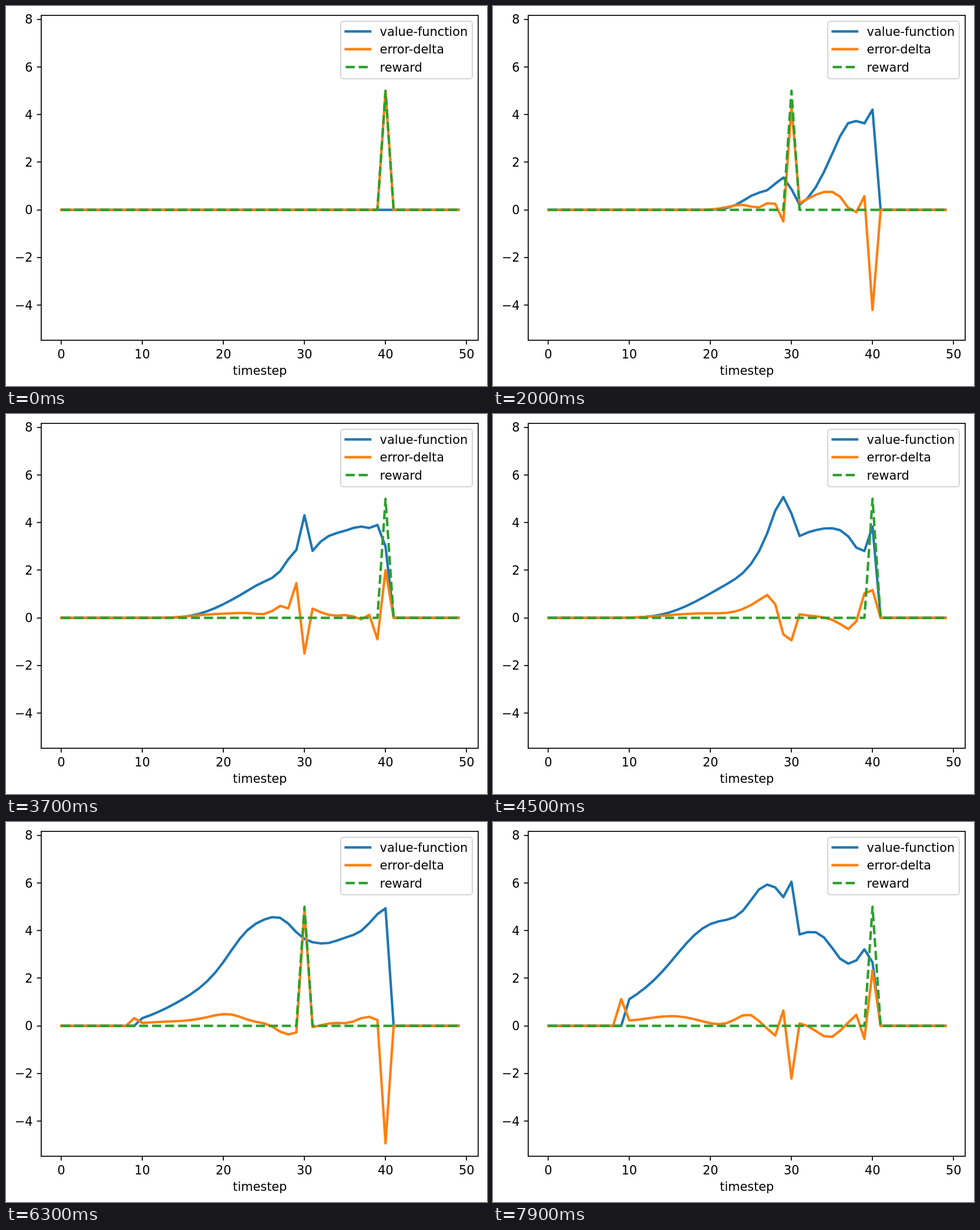
Write an HTML page that moves like this. It is 819 by 648 pixels and loops after 8000 ms.

```html
<!DOCTYPE html>
<html lang="en">
<head>
<meta charset="utf-8">
<title>Temporal-difference learning</title>
<style>
  html, body { margin: 0; width: 100%; height: 100%; overflow: hidden; background: #fff; }
  svg { display: block; width: 819px; height: 648px; }
  text { font: 20.83px "DejaVu Sans", sans-serif; fill: #000; }
  .axis { fill: none; stroke: #000; stroke-width: 1.67; }
  .line { fill: none; stroke-width: 4.17; stroke-linejoin: round; stroke-linecap: square; }
  .value { stroke: #1f77b4; }
  .error { stroke: #ff7f0e; }
  .reward { stroke: #2ca02c; stroke-linecap: butt; stroke-dasharray: 15.42 6.67; }
</style>
</head>
<body>
<svg viewBox="0 0 819 648">
  <g id="ticks"></g>
  <path id="value" class="line value"/>
  <path id="error" class="line error"/>
  <path id="reward" class="line reward"/>
  <rect class="axis" x="60" y="16" width="744" height="554"/>
  <text x="432.3" y="629" text-anchor="middle">timestep</text>
  <rect x="570" y="26" width="224" height="98" rx="4.2" fill="#fff" fill-opacity=".8"
        stroke="#ccc" stroke-opacity=".8" stroke-width="2.08"/>
  <g id="legend"></g>
</svg>
<script>
const STEPS = 50, CUE = 10, RATE = 0.3, REWARD = 5;
const TRIALS = 80, TRIAL_MS = 100;
const EARLY = 30, LATE = 40;

// Trials whose reward comes early; in all others it comes late.
const earlyTrials = new Set([4, 6, 14, 16, 20, 22, 29, 32, 36, 38, 40, 41,
  50, 52, 63, 64, 65, 66, 67, 69, 72, 75, 78]);

const byId = id => document.getElementById(id);
const px = step => 94.1 + step * 13.803;
const py = level => 347.6 - level * 40.6;
const toPath = data =>
  "M" + data.map((v, i) => px(i).toFixed(2) + " " + py(v).toFixed(2)).join("L");

// TD(0): the value of every step after the cue moves toward reward + next value.
function simulate() {
  const value = new Array(STEPS).fill(0);
  const frames = [];
  for (let trial = 0; trial < TRIALS; trial++) {
    const rewardStep = earlyTrials.has(trial) ? EARLY : LATE;
    const reward = value.map((_, i) => (i === rewardStep ? REWARD : 0));
    const error = value.map((v, i) => reward[i] + (value[i + 1] || 0) - v);
    frames.push({ value: toPath(value), error: toPath(error), reward: toPath(reward) });
    for (let i = CUE; i < STEPS; i++) value[i] += RATE * error[i];
  }
  return frames;
}

function drawTicks() {
  let out = "";
  for (let step = 0; step <= 50; step += 10) {
    const x = Math.round(px(step));
    out += `<path class="axis" d="M${x} 570v7.3"/>` +
      `<text x="${px(step)}" y="601" text-anchor="middle">${step}</text>`;
  }
  for (let level = -4; level <= 8; level += 2) {
    const y = Math.round(py(level));
    const label = String(level).replace("-", "\u2212");
    out += `<path class="axis" d="M60 ${y}h-7.3"/>` +
      `<text x="45.6" y="${py(level) + 7.6}" text-anchor="end">${label}</text>`;
  }
  byId("ticks").innerHTML = out;
}

function drawLegend() {
  const entries = [["value", "value-function"], ["error", "error-delta"], ["reward", "reward"]];
  byId("legend").innerHTML = entries.map(([kind, label], i) => {
    const y = 43.3 + i * 30.4;
    return `<path class="line ${kind}" d="M578.4 ${y}h41.66"/>` +
      `<text x="636.6" y="${y + 7.5}">${label}</text>`;
  }).join("");
}

const frames = simulate();
let shown = -1;

function render(time) {
  const trial = Math.floor(time / TRIAL_MS) % TRIALS;
  if (trial === shown) return;
  shown = trial;
  for (const [id, d] of Object.entries(frames[trial])) byId(id).setAttribute("d", d);
}

drawTicks();
drawLegend();
render(0);
const start = performance.now();
(function loop() {
  render(performance.now() - start);
  requestAnimationFrame(loop);
})();
</script>
</body>
</html>
```
